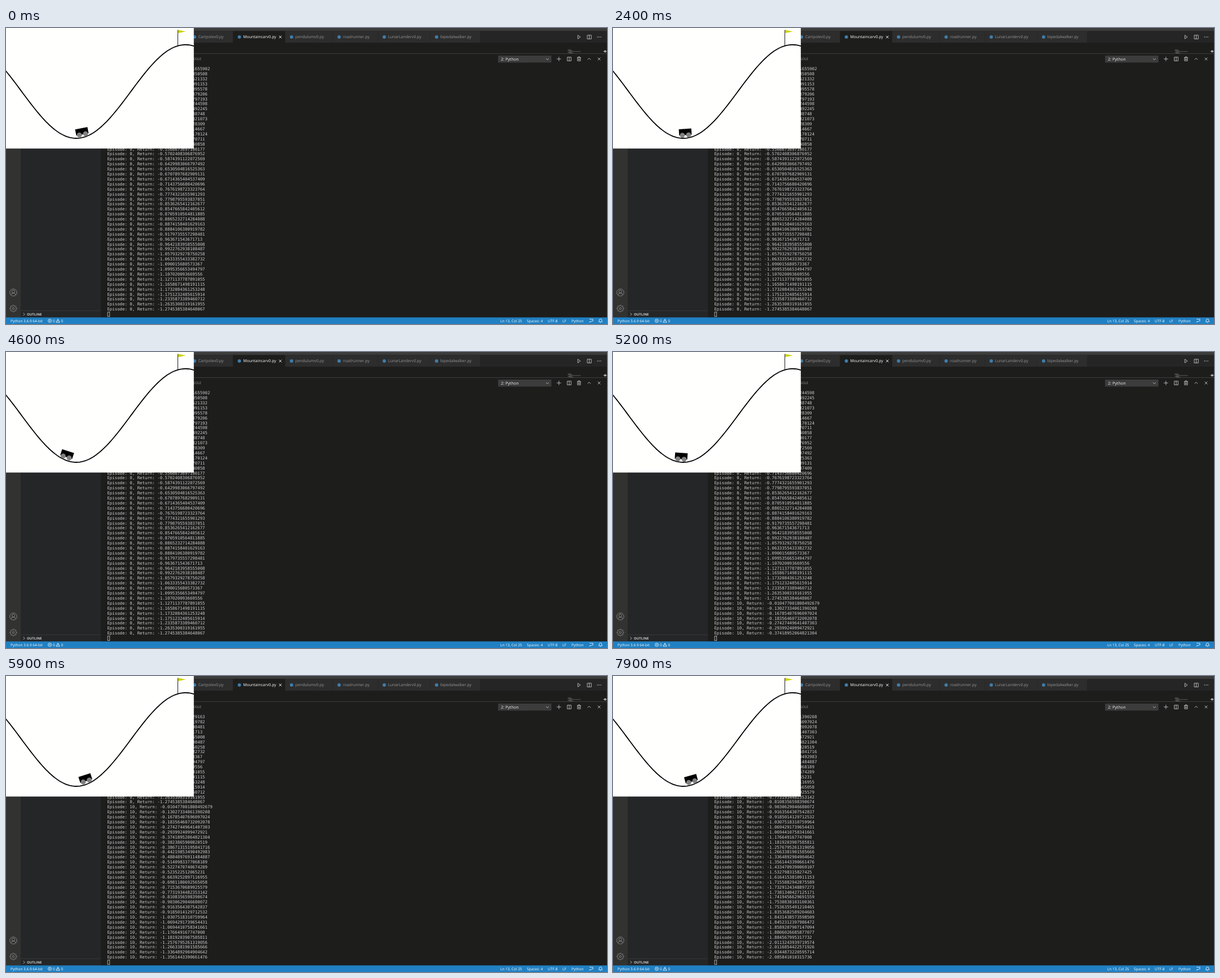
An HTML page that plays this animation: 1065x526 px, repeating every 8 s.

```html
<!DOCTYPE html>
<html lang="en">
<head>
<meta charset="utf-8">
<title>Mountain car</title>
<style>
  html, body { margin: 0; width: 100%; height: 100%; overflow: hidden; background: #1d1d1c; }
  svg { display: block; width: 1065px; height: 526px; text-rendering: geometricPrecision; }
  text { font-family: "Open Sans", "Noto Sans", sans-serif; }
  #log text { font: 7.384px "DejaVu Sans Mono", monospace; fill: #cccccc; }
  .icon { fill: none; stroke: #c5c5c5; stroke-width: .9; }
</style>
</head>
<body>
<svg viewBox="0 0 1065 526">
  <rect width="1065" height="526" fill="#1d1d1c"/>
  <rect width="1065" height="5.5" fill="#3c3c3c"/>
  <rect y="5.5" width="1065" height="20.5" fill="#252526"/>
  <g id="tabs"></g>
  <path class="icon" d="M483.8 13.7l4.6 4.6m0-4.6l-4.6 4.6" style="stroke:#fff"/>

  <g class="icon">
    <path d="M1013.3 12.8v6.4l4.6-3.2z"/>
    <path d="M1030 12.8h7.2v6.6h-7.2zM1033.6 12.8v6.6"/>
    <path d="M976 55h7.6m-3.8-3.8v7.6"/>
    <path d="M994.6 51.8h6.8v6.6h-6.8zM998 51.8v6.6"/>
    <path d="M1012 52.4h6.8m-4.6 0v-1.2h2.4v1.2m-3.8 0v6h5.2v-6m-3.4 1.6v3m1.6-3v3"/>
    <path d="M1030.6 56.4l2.8-2.8l2.8 2.8"/>
    <path d="M1048.6 52.6l4.8 4.8m0-4.8l-4.8 4.8"/>
  </g>
  <g fill="#c5c5c5">
    <circle cx="1048.2" cy="16" r=".8"/><circle cx="1051.1" cy="16" r=".8"/><circle cx="1054" cy="16" r=".8"/>
  </g>
  <path d="M995.5 38.8h6m-6 1.6h8m-6 1.5h21m-23 1.6h7m-5 1.2h8" stroke="#777" stroke-width=".7"/>
  <path d="M1058 41.5h7" stroke="#777" stroke-width=".8"/><circle cx="1061.7" cy="41.5" r="2" fill="#b0b0b0"/>
  <path d="M168 45.5h897" stroke="#414141" stroke-width=".9"/>
  <text x="346" y="57.2" font-size="6" text-anchor="end" fill="#979797">DEBUG CONSOLE</text>
  <rect x="872" y="49" width="94.5" height="12.4" fill="#3c3c3c"/>
  <text x="877" y="57.7" font-size="7.2" fill="#f0f0f0">2: Python</text>
  <path class="icon" d="M957 54.2l2.4 2.4l2.4-2.4"/>

  <rect y="200" width="26" height="314.5" fill="#323231"/>
  <rect x="26" y="200" width="142" height="314.5" fill="#242628"/>
  <path d="M26 502.5h142" stroke="#3b3c3e" stroke-width=".8"/>
  <path class="icon" d="M30.6 506.2l2.5 2.5l-2.5 2.5"/>
  <text x="37" y="511" font-size="6" font-weight="700" fill="#cccccc">OUTLINE</text>
  <g class="icon" style="stroke:#8a8a8a">
    <circle cx="13" cy="470" r="6.3"/><circle cx="13" cy="468.3" r="2.5"/>
    <path d="M8.8 474.6q.6-3.6 4.2-3.6t4.2 3.6"/>
    <circle cx="13" cy="498.5" r="1.8"/>
    <path id="gear"/>
  </g>

  <g id="log"></g>
  <rect x="180.1" y="504.8" width="3.6" height="7.9" fill="none" stroke="#cccccc" stroke-width=".8"/>

  <rect y="514.3" width="1065" height="11.7" fill="#2080c3"/>
  <g id="status" font-size="6.5" fill="#ffffff"></g>
  <g class="icon" style="stroke:#fff;stroke-width:.8">
    <circle cx="77.5" cy="520.3" r="3"/><path d="M76.3 519.1l2.4 2.4m0-2.4l-2.4 2.4"/>
    <path d="M92 517.3l3.2 5.7h-6.4zM92 519.3v1.7"/>
    <path d="M1034 517.4h6v3.4h-2.4l-1.6 1.6v-1.6M1034 523.4q.3-2 1.6-2"/>
    <path d="M1050.2 522q1-1 1-3q.2-2 2.2-2t2.2 2q0 2 1 3zM1052.6 523.3h1.6"/>
  </g>

  <rect width="332.8" height="214.2" fill="#fffffe"/>
  <path id="track" fill="none" stroke="#000" stroke-width="1.8"/>
  <path d="M304.5 31.6V3.5" stroke="#000" stroke-width=".9"/>
  <path d="M304.9 3.5v5.6l13.8-2.8z" fill="#c9d000"/>
  <g id="car">
    <rect x="-11.1" y="-16.6" width="22.2" height="11.1"/>
    <circle cx="-5.54" cy="-5.54" r="4.43" fill="#808080"/>
    <circle cx="5.54" cy="-5.54" r="4.43" fill="#808080"/>
  </g>
</svg>
<script>
const $ = id => document.getElementById(id);
const DURATION = 8000, STEP = 100, ROWS = 49;

function add(parent, tag, attrs, text = '') {
  const el = document.createElementNS('http://www.w3.org/2000/svg', tag);
  for (const key in attrs) el.setAttribute(key, attrs[key]);
  el.textContent = text;
  return parent.appendChild(el);
}

// Editor tabs: left edge and file name
const tabs = [[323, 'Cartpolev0.py'], [402.5, 'Mountaincarv0.py'], [495, 'pendulumv0.py'],
  [579.3, 'roadrunner.py'], [659.3, 'LunarLanderv0.py'], [752, 'bipedalwalker.py']];
tabs.forEach(([x, name], i) => {
  const right = i + 1 < tabs.length ? tabs[i + 1][0] : 840.5;
  const active = i === 1;
  add($('tabs'), 'rect', { x, y: 5.5, width: right - x - .6, height: 20.5, fill: active ? '#1d1d1c' : '#2d2d2d' });
  add($('tabs'), 'circle', { cx: x + 11, cy: 16, r: 3, fill: '#3f7ca8' });
  add($('tabs'), 'text', { x: x + 17.7, y: 18.4, 'font-size': 7, fill: active ? '#ffffff' : '#969696' }, name);
});

[[8, 'Python 3.6.9 64-bit'], [83, '0'], [97.5, '0'], [876, 'Ln 13, Col 25'], [923, 'Spaces: 4'],
 [960, 'UTF-8'], [986, 'LF'], [1002, 'Python']
].forEach(([x, label]) => add($('status'), 'text', { x, y: 522.6 }, label));

const gear = Array.from({ length: 32 }, (_, i) => {
  const angle = (i - .5) * Math.PI / 16, radius = i % 4 < 2 ? 6.2 : 4.6;
  return `${(13 + radius * Math.cos(angle)).toFixed(2)} ${(498.5 + radius * Math.sin(angle)).toFixed(2)}`;
});
$('gear').setAttribute('d', `M${gear.join('L')}z`);

// Terminal output: every step of an episode costs the square of a random action
function seeded(seed) {
  return () => {
    seed = (seed * 1664525 + 1013904223) % 4294967296;
    return seed / 4294967296;
  };
}
function episode(number, steps, total) {
  const random = seeded(number + 7);
  let sum = 0;
  const sums = Array.from({ length: steps }, () => sum += random() ** 2);
  return sums.map(s => `Episode: ${number}, Return: ${-s / sum * total}`);
}
const lines = [...episode(0, ROWS, 1.2745385384648067), ...episode(10, 50, 2.085841010315736)];
const rows = Array.from({ length: ROWS }, (_, i) =>
  add($('log'), 'text', { x: 179.4, y: (75.2 + i * 8.896).toFixed(2) }));

// Track: height = .45 sin(3p) + .55 for p from -1.2 to 0.6
const WIDTH = 332.6, SCALE = WIDTH / 1.8, LEFT = -.5, BASE = 214.5, VALLEY = 124.6;
const position = x => (x - LEFT) / SCALE - 1.2;
const trackY = x => BASE - SCALE * (.45 * Math.sin(3 * position(x)) + .55);
const points = Array.from({ length: 100 }, (_, i) => {
  const x = LEFT + (WIDTH + .8) * i / 99;
  return `${x.toFixed(2)} ${trackY(x).toFixed(2)}`;
});
$('track').setAttribute('d', `M${points.join('L')}`);

// Each run starts at a reset and swings between [time, offset from the valley] turning points
const runs = [
  [[-216, 16.4], [685, -16.4], [1585, 16.4]],
  [[1000, -4.5], [1150, -4.5], [1650, -8.7], [2350, -3]],
  [[2350, 4.3], [3220, -11], [4000, 4.5]],
  [[3700, 11.5], [4780, -21.9], [5680, 15]],
  [[5030, -4.5], [5550, -4.4], [5950, 20.3], [6330, 17.4], [7080, -13], [7750, 8]],
  [[7700, 21.8], [8500, -15]]
];
const printed = [[5000, 0], [5200, 7], [5900, 31], [6400, 50]];

const linear = u => u;
const swing = u => (1 - Math.cos(Math.PI * u)) / 2;
function along(keys, t, ease) {
  if (t <= keys[0][0]) return keys[0][1];
  const i = keys.findIndex(key => key[0] > t);
  if (i < 0) return keys[keys.length - 1][1];
  const [t0, a] = keys[i - 1], [t1, b] = keys[i];
  return a + (b - a) * ease((t - t0) / (t1 - t0));
}

let shown = -1;
function render(t) {
  const run = runs.filter(keys => keys[0][0] <= t).pop();
  const x = VALLEY + along(run, t, swing);
  const tilt = -Math.cos(3 * position(x)) * 180 / Math.PI;
  $('car').setAttribute('transform', `translate(${x.toFixed(2)} ${trackY(x).toFixed(2)}) rotate(${tilt.toFixed(2)})`);

  const scrolled = Math.floor(along(printed, t, linear) + 1e-6);
  if (scrolled !== shown) {
    rows.forEach((row, i) => { row.textContent = lines[scrolled + i]; });
    shown = scrolled;
  }
}

const begin = performance.now();
function tick() {
  const t = (performance.now() - begin) % DURATION;
  render(Math.floor(t / STEP) * STEP);
  requestAnimationFrame(tick);
}
tick();
</script>
</body>
</html>
```
